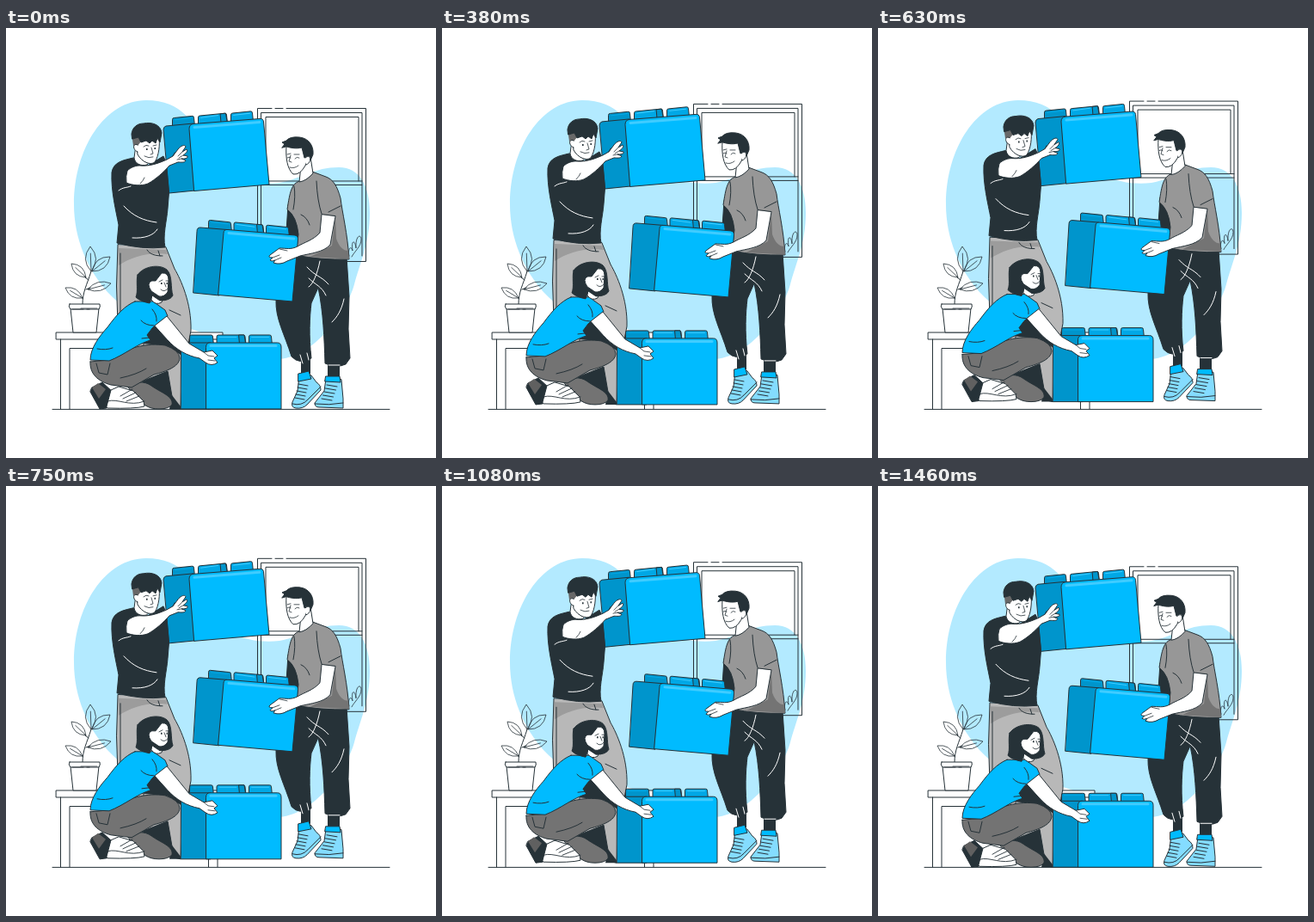
Animation, 500 px wide and 500 px high, one loop 1.5 s. Source, as an HTML page with a canvas:

```html
<!DOCTYPE html>
<html lang="en">
<head>
<meta charset="utf-8">
<title>Stacking bricks</title>
<style>
html, body { margin: 0; width: 100%; height: 100%; overflow: hidden; background: #fff; }
canvas { display: block; width: 500px; height: 500px; }
</style>
</head>
<body>
<canvas id="stage"></canvas>
<script>
const canvas = document.getElementById('stage');
const ctx = canvas.getContext('2d');
const ratio = window.devicePixelRatio || 1;
canvas.width = canvas.height = 500 * ratio;

const INK = '#263238', BLUE = '#00bbff', SIDE = '#0095cc', STUD = '#00a8e6';
const PALE = '#b3eaff', WHITE = '#fff', SHOE = '#84dcff', SHINE = '#40ccff';
const LOOP = 1500, RISE = 10, LEAD = 30;

function shape(d, fill, stroke = INK, width = 1) {
  const path = new Path2D(d);
  if (fill) { ctx.fillStyle = fill; ctx.fill(path); }
  if (stroke) { ctx.strokeStyle = stroke; ctx.lineWidth = width; ctx.stroke(path); }
}
const line = (d, color = INK, width = 1) => shape(d, null, color, width);
const flat = (d, fill) => shape(d, fill, null);

function blob() {
  flat('M163 84C205 84 221 112 232 140C245 172 285 184 318 180C345 175 358 162 387 162' +
    'C412 162 423 185 423 215C423 250 411 275 405 298C398 325 362 381 318 385' +
    'C280 387 255 362 215 350C180 338 150 342 118 307C95 281 79 245 79 205C79 140 115 84 163 84Z', PALE);
}

function houseWindow() {
  line('M309 93.5H292.5V271.5H418.5V93.5H326M313 93.5H322');
  line('M296.5 178V98.5H414V265M302 178V103.5H410V178');
  line('M296.5 178H414M296.5 182.5H414M296.5 182.5V267');
  line('M399 265C397 257 401 252 403 259C401 246 406 246 407 256C406 241 413 239 413 246C413 254 405 260 402 266', INK, 0.8);
}

function leaf(x, y, tipX, tipY, bend) {
  const dx = tipX - x, dy = tipY - y;
  const side = s => `${x + dx * 0.5 - s * dy * bend} ${y + dy * 0.5 + s * dx * bend}`;
  line(`M${x} ${y}Q${side(1)} ${tipX} ${tipY}Q${side(-1)} ${x} ${y}L${x + dx * 0.72} ${y + dy * 0.72}`, INK, 0.8);
}

function tableAndPlant() {
  flat('M64 362H246V443H236V372H74V443H64Z', WHITE);
  shape('M58.5 354H252V362H58.5Z', WHITE);
  line('M63.5 362V443M74 443V372.5H235.5V443M246 362V443');
  line('M89 321C89 307 94 299 99 283M93 304L98 302M92 290L96 293');
  leaf(99, 283, 98, 254, 0.42);
  leaf(100, 283, 121, 266, 0.42);
  leaf(93, 290, 76, 274, 0.42);
  leaf(95, 304, 122, 297, 0.36);
  leaf(89, 314, 69, 302, 0.4);
  shape('M75 326L78 354H105L108 326Z', WHITE);
  shape('M74 321H109Q110 324 108 327H75Q72 324 74 321Z', WHITE);
  line('M77 327H90M94 327H97M87 326H106', INK, 0.8);
}

function floorLine() {
  line('M54 443.4H446', INK, 1);
}

// A stud is a slanted block: left x, top y, width, slope per px, optional dark flank.
function stud(x, y, w, slope, fill, flank = 0) {
  const drop = w * slope, r = 2;
  const body = `M${x} ${y + 12}V${y + r}Q${x} ${y} ${x + r} ${y}L${x + w - r} ${y + drop}` +
    `Q${x + w} ${y + drop} ${x + w} ${y + drop + r}L${x + w + 1} ${y + drop + 12}Z`;
  shape(body, fill);
  if (flank) {
    const fx = x + w - flank, fy = y + drop - flank * slope;
    shape(`M${fx} ${fy}L${x + w - 1} ${y + drop}L${x + w + 1} ${y + drop + 12}H${fx + 1}Z`, SIDE);
  }
  line(`M${x + 3} ${y + 2.4}L${x + w - flank - 3} ${y + drop + 2.4}`, fill === SIDE ? STUD : SHINE, 1);
}

function brick(studs, slope, side, front, shine) {
  stud(...studs[0], slope, SIDE);
  stud(...studs[1], slope, STUD, 7);
  stud(...studs[2], slope, STUD);
  shape(side, SIDE);
  shape(front, BLUE);
  line(shine, SHINE, 3);
}

function topBrick() {
  brick([[193.5, 104.5, 25], [223.5, 102, 33], [261.5, 99, 25]], -0.085,
    'M183 118Q183 115 186 114L218 111L220 189L190 192Z',
    'M213 117Q213 112 218 111.5L295 105.5Q299 105 299.5 109L306 182L219 189.5Z',
    'M219 115.5L295 109.5');
}

function middleBrick() {
  brick([[235.5, 223.5, 26], [265, 226, 34], [302.5, 229.3, 26]], 0.085,
    'M222 236Q222 232 226 232L257 234.5L248 311L218 308Z',
    'M253 238Q253 234 258 234.5L336 241Q340 242 339.5 246L333 318L247 310.5Z',
    'M259 238.5L335 245');
}

function bottomBrick() {
  brick([[213.5, 357, 27], [245, 357, 33], [282.5, 357, 26]], 0,
    'M203.5 370Q203.5 366 207 366H238V443H203.5Z',
    'M232.5 371Q232.5 366 237 366H315.5Q320 366 320 371V443H233Z',
    'M238 369.5H314');
}

function tallMan() {
  shape('M130 252L128.5 300L130 345L155 400L190 440L203 443L206 398L215 352' +
    'C216 320 203 292 196 280L186 255Z', '#b8b8b8');
  flat('M131 256L186 258L188 263C165 260 145 267 131 276Z', '#9c9c9c');
  flat('M193 427L203 440V443H190Z', INK);
  line('M164 258C167 263 173 265 182 265M177 259L179 265M133 262V332M190 328L203 334M160 360V393');
  shape('M148 151C135 154 125 156 123 168C122 190 128 213 131 229L129 250Q158 258 185 255' +
    'C182 241 187 224 188 210L190 185L187 158L183 149L165 160Z', INK);
  line('M137 207C148 219 160 224 175 226M147 244C161 245 172 241 176 234M131 189C136 185 140 186 145 184', WHITE);
  shape('M151 136L149 151C150 158 157 161 164 159L172 150Z', WHITE);
  shape('M151 130L153 147C158 156 168 160 173 156C178 148 179 136 178 126L158 124Z', WHITE);
  flat('M146 122L148 137L153 137L157 132V122Z', '#686868');
  shape('M153 136C147 133 147 142 153 144', WHITE);
  shape('M146 123C147 115 153 111 160 111C169 109 180 112 181 122L179 133L176 128' +
    'L174 134L170 131L167 134L163 131L157 133L154 127L147 129Z', INK);
  line('M160 138Q163 135 166 137M171 137L175 136M169 139L171 146L168 147M161 149Q166 152 171 150', INK, 0.8);
  flat('M163 140h1.6v2h-1.6ZM172.5 139h1.5v2h-1.5Z', INK);
}

function tallManArm() {
  shape('M141 166C146 161 152 160 156 160C166 161 176 158 187 153L194 149L200 141' +
    'C203 137 208 135 209 138L205 144L210 141C212 143 209 146 206 148L211 149' +
    'C212 152 207 152 204 152L209 154C208 157 203 156 200 156L190 160' +
    'C183 168 174 176 165 181C157 184 147 183 140 180Q139 172 141 166Z', WHITE);
  line('M205 144L200 149M206 148L201 151M204 152L199 153M194 149L196 145M156 181Q160 177 161 174', INK, 0.8);
}

function shoes() {
  flat('M343 385L343 403L354 402V383Z', INK);
  flat('M374 390L374 407H388L388 390Z', INK);
  shape('M341 405L339 422L333 435Q331 441 337 442Q345 443 350 438L366 421Q366 415 361 412L355 404Z', SHOE);
  shape('M372 408L370 422L359 436Q359 441 364 441L392 442V431L390 409Z', SHOE);
  shape('M340 402L352 399L355 408L340 411Z', BLUE);
  shape('M372 405L388 405L389 412L371 411Z', BLUE);
  line('M333 437Q344 440 351 432L366 417M359 437Q376 439 392 436', INK, 1);
  for (let i = 0; i < 5; i++) {
    line(`M${340 - i} ${414 + i * 4}l11 2M${373 - i * 1.5} ${415 + i * 4}l12 2`, INK, 1);
  }
}

function shortMan() {
  shoes();
  shape('M337 262C337 286 335 300 329 305L314 316C313 338 324 356 332 382Q341 392 355 384' +
    'C352 358 353 337 355 320L363 302C369 330 370 360 371 390Q384 396 395 391L400 384' +
    'L398 350L399 312L396 266Z', INK);
  line('M350 278C360 289 366 288 375 298M352 291C360 299 367 300 372 311M365 271C362 286 357 298 352 301' +
    'M393 315C390 329 385 336 379 342M342 380L345 390M350 378L352 386M375 392H388', WHITE);
  shape('M328 206L326 236Q329 247 340 249L342 218Z', INK);
  shape('M342 178C332 180 330 191 327 211Q338 219 340 240L337 264Q365 270 399 269' +
    'C397 238 391 215 389 198C385 183 380 176 372 173L356 167Z', '#979797');
  flat('M383 219L379 253L354 266L399 268.5L398 259Q389 259 384 245Z', '#747474');
  line('M335 184Q337 196 334 211M361 178Q362 201 367 216M375 214L389 207M343 217Q350 220 353 229');
  shape('M343 160L341 179Q349 178 357 169L354 150Z', WHITE);
  shape('M326 137C325 151 327 164 334 170Q342 171 348 160L353 147L343 134Z', WHITE);
  shape('M321 139L324 135L321 133L326 131Q330 126 341 127C352 128 358 137 357 147L354 154L350 149' +
    'L347 151L344 139C337 141 330 139 326 138Z', INK);
  shape('M348 151C355 145 356 157 349 159', WHITE);
  line('M327 147L331 146M335 147L341 147M331 148L329 155L332 156M330 162Q335 164 340 160' +
    'M327 151Q329 149 331 151M336 152Q338 149 341 151', INK, 0.8);
}

function shortManArm() {
  shape('M367 217L365 238C357 247 347 249 339 254C331 258 326 256 318 256L307 264' +
    'Q304 267 310 267L307 270Q309 272 313 270L311 273Q319 276 327 271L342 265' +
    'C354 262 369 261 377 252L383 219Z', WHITE);
  line('M310 267L318 264M313 270L320 267M318 257L327 259', INK, 0.8);
}

function crouchingWoman() {
  flat('M163 350L176 345L204 371L203 380L188 370L160 367Z', INK);
  shape('M100 418L112 412L125 424L117 442L109 443L98 423Z', INK);
  flat('M100 418L107 413L116 420L108 431Z', '#606060');
  shape('M158 411L188 399L194 434L180 430Z', INK);
  shape('M142 417C150 411 161 410 169 416C180 424 195 428 193 438Q189 443 178 443' +
    'C164 443 159 437 150 428Z', '#737373');
  shape('M117 440L122 421L131 417L148 422L160 434L161 440Q150 443 118 442Z', WHITE);
  line('M118 434C130 430 143 441 161 434M133 428L147 420M136 431L151 424M140 434L155 428', INK, 0.9);
  shape('M98 388L120 386C140 371 165 366 185 369Q202 375 202 384C201 394 187 399 172 403' +
    'L146 418L122 415C107 411 97 402 98 388Z', '#737373');
  line('M105 390L108 401L118 403L121 390M133 407Q152 403 163 396M125 382L133 376');
  shape('M150 318L171 318L185 328L188 335C183 342 175 344 170 349L164 357L168 363' +
    'C153 367 138 380 120 387L98 386C98 372 109 358 118 348C129 333 138 323 150 318Z', BLUE);
  line('M157 340Q162 346 172 346M106 373Q116 375 124 372M158 361L167 360M170 327Q176 334 175 341');
  shape('M173 346L187 335L213 367L230 377L240 375L246 381L242 384L246 389Q239 394 232 389' +
    'L225 384C210 381 198 374 188 363Z', WHITE);
  line('M230 377L235 381L242 382M235 386L243 387', INK, 0.8);
  shape('M170 301L169 316Q174 323 181 319L185 306Z', WHITE);
  shape('M153 287C160 277 178 274 187 281C194 288 191 302 194 311Q191 317 179 317' +
    'L170 311L167 320Q156 318 151 313C154 306 151 295 153 287Z', INK);
  shape('M169 294L174 294L181 285Q189 284 189 293L188 307Q184 313 178 312L169 306Q163 297 169 294Z', WHITE);
  line('M178 295L182 293M186 294L189 294M184 296L186 301M180 304Q184 308 188 303', INK, 0.8);
  flat('M180 296h1.6v2h-1.6ZM186.5 296h1.3v2h-1.3Z', INK);
}

function liftAt(ms) {
  const phase = ((ms + LEAD) % LOOP) / LOOP;
  return RISE * (1 - Math.abs(1 - 2 * phase));
}

function floating(offset, parts) {
  ctx.save();
  ctx.translate(0, offset);
  parts.forEach(part => part());
  ctx.restore();
}

function draw(ms) {
  ctx.setTransform(ratio, 0, 0, ratio, 0, 0);
  ctx.lineJoin = ctx.lineCap = 'round';
  ctx.fillStyle = WHITE;
  ctx.fillRect(0, 0, 500, 500);
  const offset = 0.4 - liftAt(ms);
  blob();
  floating(offset, [houseWindow]);
  tableAndPlant();
  floorLine();
  floating(offset, [tallMan, topBrick, tallManArm, shortMan, middleBrick, shortManArm,
    bottomBrick, crouchingWoman]);
}

const start = performance.now();
function tick() {
  draw(performance.now() - start);
  requestAnimationFrame(tick);
}
tick();
</script>
</body>
</html>
```
